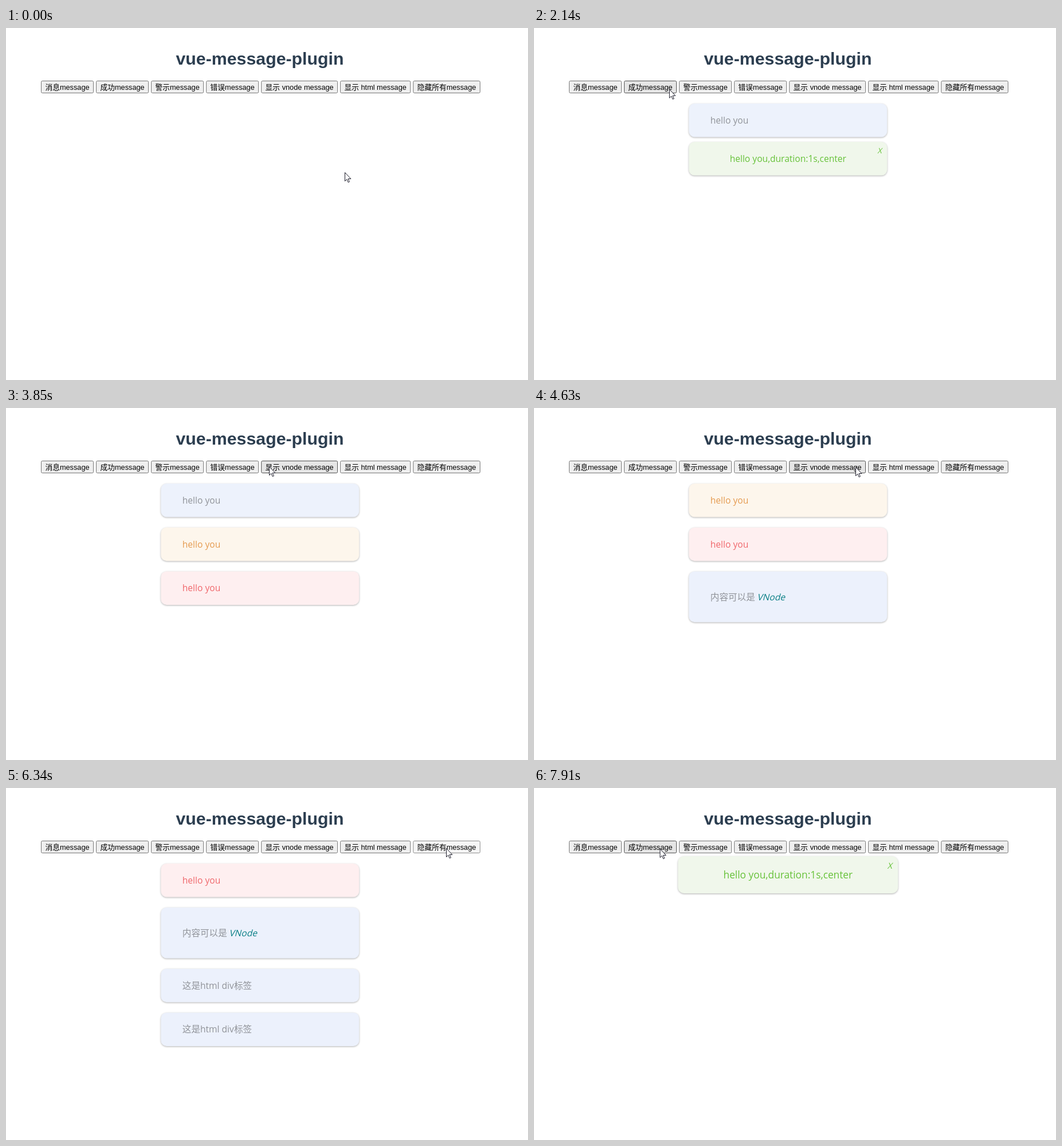
These frames come from a looping animation (911 by 615 pixels, 7.99 s). An HTML page:

```html
<!DOCTYPE html>
<html lang="zh-CN">
<head>
<meta charset="utf-8">
<style>
  html, body { margin: 0; height: 100%; overflow: hidden; background: #fff; }
  svg { display: block; width: 911px; height: 615px; }
  .title { font: bold 30.3px "Liberation Sans", Arial, sans-serif; fill: #2c3e50; text-anchor: middle; }
  .btn rect { fill: #efefef; stroke: #767676; }
  .btn.hover rect { fill: #e5e5e5; stroke: #4f4f4f; }
  .btn.press rect { fill: #f5f5f5; stroke: #8d8d8d; }
  .btn text { font: 12.76px "Liberation Sans", "Noto Sans CJK SC", "Noto Sans CJK", sans-serif; }
  .msg text { font: 15.6px "Open Sans", "Noto Sans CJK SC", "Noto Sans CJK", sans-serif; }
  .msg rect { filter: drop-shadow(0 1px 1.5px rgba(0, 0, 0, .3)); }
</style>
</head>
<body>
<svg id="stage" viewBox="0 0 911 615">
  <text class="title" x="443" y="64.3">vue-message-plugin</text>
</svg>
<script>
const LOOP = 7990, CENTER = 443.3, WIDTH = 346, TOP = 113.8;
const ENTER = 160, LEAVE = 70, PRESS = 110, TRAVEL = 270;
const stage = document.getElementById('stage');

function add(parent, tag, attrs, text) {
  const el = document.createElementNS('http://www.w3.org/2000/svg', tag);
  for (const key in attrs) el.setAttribute(key, attrs[key]);
  if (text) el.textContent = text;
  return parent.appendChild(el);
}

// Each button opens its own kind of message; the last one clears them all
const CLEAR = 6;
const kinds = [
  { label: '消息message', bg: '#edf2fc', color: '#909399', text: 'hello you' },
  { label: '成功message', bg: '#f0f7eb', color: '#67c23a', text: 'hello you,duration:1s,center',
    closable: true, gap: 8.6, life: 1160 },
  { label: '警示message', bg: '#fdf6ec', color: '#e59b50', text: 'hello you', life: 2920 },
  { label: '错误message', bg: '#feeff0', color: '#f0686c', text: 'hello you' },
  { label: '显示 vnode message', bg: '#ecf1fc', color: '#909399', text: '内容可以是', node: 'VNode', height: 88.8 },
  { label: '显示 html message', bg: '#ecf1fc', color: '#909399', text: '这是html div标签' },
  { label: '隐藏所有message' }
];

let edge = 61;
const buttons = kinds.map(({ label }) => {
  const el = add(stage, 'g', { class: 'btn' });
  const rect = add(el, 'rect', { x: edge + .5, y: 92.5, height: 21, rx: 2 });
  const text = add(el, 'text', { x: edge + 7.4, y: 108 }, label);
  const left = edge, right = left + text.getComputedTextLength() + 14.8;
  rect.setAttribute('width', right - left - 1);
  edge = right + 4;
  return { left, right, el };
});

// Button index, time of the click
const clicks = [[0, 911], [1, 1677], [2, 2692], [3, 3429], [4, 4328], [5, 5027], [5, 5332], [CLEAR, 6380], [1, 7837]];

function slanted(parent, x, y, size, fill, text) {
  const style = `font-size: ${size}px`;
  add(parent, 'text', { transform: `translate(${x} ${y}) skewX(-14)`, style, fill }, text);
}

// Messages are drawn around their own centre
const messages = clicks.filter(([i]) => i !== CLEAR).map(([i, enter]) => {
  const { bg, color, text, node, closable, gap = 18.2, height = 58.5, life = 3419 } = kinds[i];
  const clear = clicks.find(([b, at]) => b === CLEAR && at > enter);
  const leave = Math.min(enter + life, clear ? clear[1] : Infinity);
  const el = add(stage, 'g', { class: 'msg' });
  add(el, 'rect', { x: -WIDTH / 2, y: -height / 2, width: WIDTH, height, rx: 10, fill: bg });
  add(el, 'text', {
    x: closable ? 0 : -135.5, y: 5.8, fill: color, 'text-anchor': closable ? 'middle' : 'start'
  }, text);
  if (closable) slanted(el, 156, -9.5, 13, color, 'X');
  if (node) slanted(el, -54, 5.8, 15.6, '#0a7f86', node);
  return { el, enter, leave, height, gap };
});

const cursor = add(stage, 'path', {
  d: 'M.5.5v15l3.4-3.2 2.3 5.4 2.2-1-2.3-5.2h4.8z', fill: '#fff', stroke: '#1c1c2a', 'stroke-linejoin': 'round'
});

// Cursor stops: arrival time, x, y
const stops = [
  [0, 591, 252], [360, 350, 170], [630, 122, 99], [1620, 233, 107], [2380, 312, 100],
  [3070, 385, 98], [3850, 459, 102], [4080, 525, 99], [4630, 561, 103], [4780, 650, 100],
  [5650, 677, 110], [5730, 773, 118], [6110, 768, 105], [6930, 540, 80], [7140, 307.5, 93],
  [7280, 290, 100], [7700, 219.5, 106], [LOOP, 219.5, 106]
];

// The cursor rests at a stop, then leaves just in time for the next one
function tipAt(t) {
  const next = stops.findIndex(([at]) => at > t);
  const [t0, x0, y0] = stops[next - 1], [t1, x1, y1] = stops[next];
  const leave = Math.max(t0, t1 - TRAVEL);
  const k = Math.max(0, (t - leave) / (t1 - leave));
  const ease = k * k * (3 - 2 * k);
  return [x0 + (x1 - x0) * ease, y0 + (y1 - y0) * ease];
}

function drawMessages(t) {
  let bottom = TOP;
  for (const { el, enter, leave, height, gap } of messages) {
    const shown = t > enter && t < leave + LEAVE;
    el.style.display = shown ? '' : 'none';
    if (!shown) continue;
    const grow = Math.min(1, (t - enter) / ENTER);
    const out = Math.max(0, (t - leave) / LEAVE);
    const bounce = grow < .5 ? 2.4 * grow : 1.4 - .4 * grow;
    const y = bottom + gap + height / 2;
    el.setAttribute('transform', `translate(${CENTER} ${y}) scale(${bounce * (1 - .18 * out)})`);
    el.setAttribute('opacity', 1 - out);
    bottom += gap + height;
  }
}

function draw(t) {
  const [x, y] = tipAt(t);
  cursor.setAttribute('transform', `translate(${x} ${y})`);
  buttons.forEach(({ left, right, el }, i) => {
    const hover = x >= left && x < right && y >= 92 && y < 114;
    const press = hover && clicks.some(([b, at]) => b === i && t >= at - PRESS && t < at);
    el.setAttribute('class', 'btn' + (press ? ' press' : hover ? ' hover' : ''));
  });
  drawMessages(t);
}

const start = performance.now();
function tick() {
  draw((performance.now() - start) % LOOP);
  requestAnimationFrame(tick);
}
tick();
</script>
</body>
</html>
```
